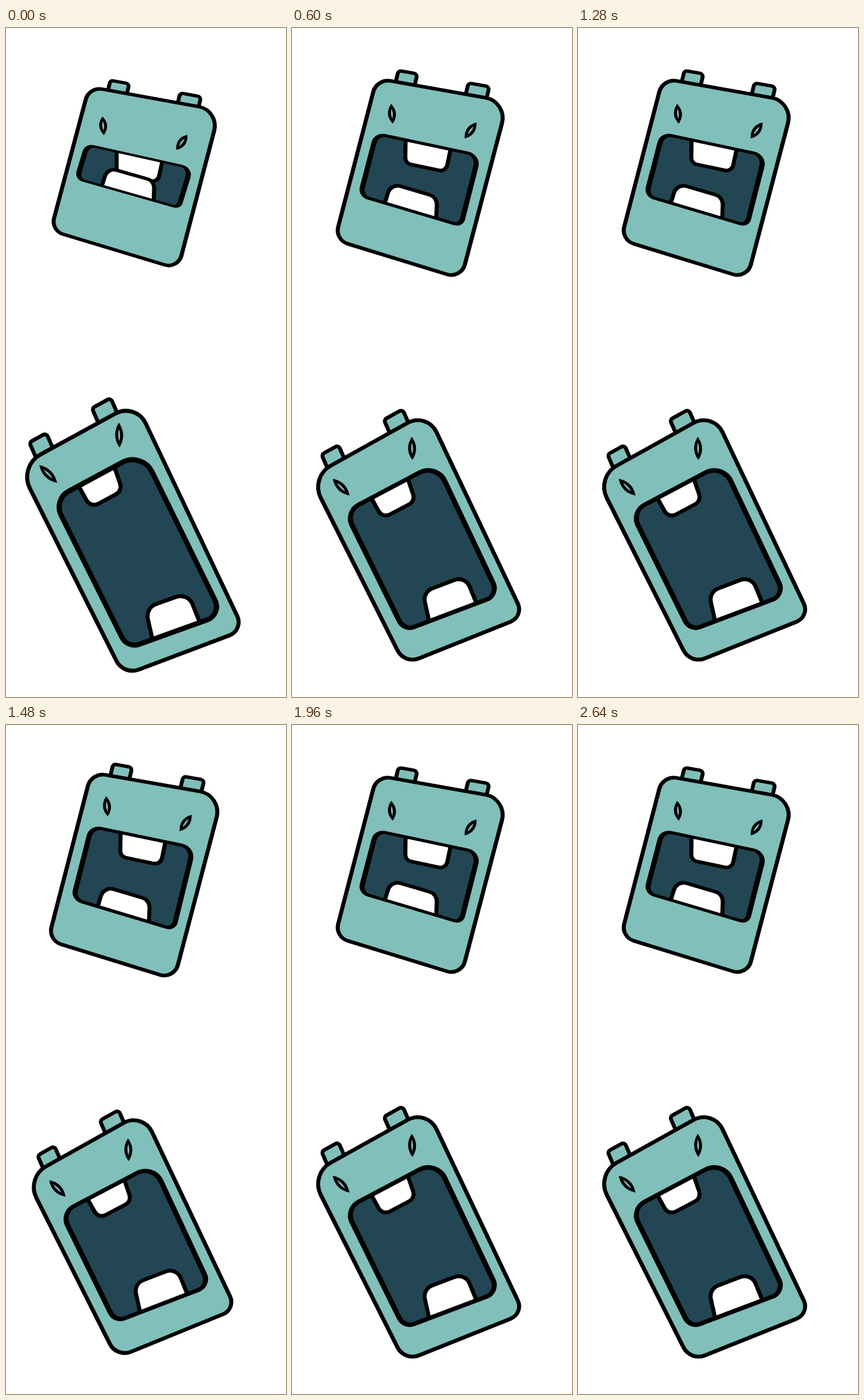
An HTML page with a canvas that plays this animation: 438x1047 px, repeating every 2680 ms.

```html
<!DOCTYPE html>
<html lang="en">
<head>
<meta charset="utf-8">
<title>Chatting monsters</title>
<style>
html, body { margin: 0; width: 100%; height: 100%; overflow: hidden; background: #fff; }
canvas { display: block; width: 438px; height: 1047px; }
</style>
</head>
<body>
<canvas id="stage"></canvas>
<script>
const W = 438, H = 1047, LOOP = 2680, STEP = 40, CYCLE = 17, PEAK = 9;
const SKIN = '#81bfba', DARK = '#224653', INK = '#000', TOOTH = '#fff';

const canvas = document.getElementById('stage');
const ctx = canvas.getContext('2d');
const dpr = window.devicePixelRatio || 1;
canvas.width = W * dpr;
canvas.height = H * dpr;

// Body and mouth: corners clockwise from top left, shut and open.
// Ears and teeth stand on their edges and grow along a vector.
const upper = {
  tilt: 0.25,
  body: {
    shut: [[130, 92], [334, 129], [269, 377], [70, 317]],
    open: [[142, 32], [349, 66], [249, 447], [56, 384]],
    radii: [28, 38, 26, 26]
  },
  mouth: {
    shut: [[127, 183], [289, 219], [270, 281], [111, 236]],
    open: [[150, 102], [303, 128], [243, 411], [91, 358]],
    radii: [26, 30, 18, 24]
  },
  ear: [6, -25],
  eyes: [
    { shut: [152, 153], open: [172, 67], axis: [3, 38] },
    { shut: [275, 179], open: [295, 93], axis: [-23, 31] }
  ],
  topTooth: { from: 0.285, to: 0.725, axis: [-5, 46] },
  lowTooth: { from: 0.245, to: 0.755, axis: [7, -41] }
};

const lower = {
  tilt: -0.46,
  body: {
    shut: [[52, 748], [233, 642], [338, 864], [154, 949]],
    open: [[20, 686], [203, 586], [372, 942], [184, 1013]],
    radii: [40, 34, 22, 28]
  },
  mouth: {
    shut: [[109, 808], [261, 732], [284, 805], [136, 869]],
    open: [[74, 738], [213, 663], [338, 918], [190, 971]],
    radii: [28, 34, 22, 22]
  },
  ear: [-10, -23],
  eyes: [
    { shut: [106, 774], open: [66, 698], axis: [28, 28] },
    { shut: [217, 714], open: [177, 637], axis: [1, 39] }
  ],
  topTooth: { from: 0.285, to: 0.685, axis: [16, 36] },
  lowTooth: { from: 0.265, to: 0.765, axis: [-15, -48] }
};

const lerp = (a, b, t) => a + (b - a) * t;
const mix = (p, q, t) => [lerp(p[0], q[0], t), lerp(p[1], q[1], t)];
const shift = (p, v, k) => [p[0] + v[0] * k, p[1] + v[1] * k];
const pose = (part, w) => part.shut.map((p, i) => mix(p, part.open[i], w));

function roundQuad(pts, radii, scale) {
  const path = new Path2D();
  path.moveTo(...mix(pts[3], pts[0], 0.5));
  pts.forEach((p, i) => path.arcTo(...p, ...pts[(i + 1) % 4], radii[i] * scale));
  path.closePath();
  return path;
}

// Rounded bump standing on the edge a-b, slightly narrower at its end
function bump(a, b, from, to, axis, k, inset, radius) {
  const narrow = (to - from) * inset;
  const left = shift(mix(a, b, from + narrow), axis, k);
  const right = shift(mix(a, b, to - narrow), axis, k);
  const end = mix(a, b, to);
  const path = new Path2D();
  path.moveTo(...mix(a, b, from));
  path.arcTo(...left, ...right, radius);
  path.arcTo(...right, ...end, radius);
  path.lineTo(...end);
  return path;
}

function fill(path, color) {
  ctx.fillStyle = color;
  ctx.fill(path);
}

// Ink line with a pen flattened by k along the tilted body axis
function ink(path, width, tilt, k) {
  const pen = new DOMMatrix().rotate(tilt * 180 / Math.PI).scale(1, k);
  const local = new Path2D();
  local.addPath(path, pen.inverse());
  ctx.save();
  ctx.transform(pen.a, pen.b, pen.c, pen.d, 0, 0);
  ctx.lineWidth = width;
  ctx.stroke(local);
  ctx.restore();
}

function lens(center, axis, k, bulge, color) {
  const len = Math.hypot(...axis);
  const side = [-axis[1] / len, axis[0] / len];
  const p = shift(center, axis, -k / 2), q = shift(center, axis, k / 2);
  const path = new Path2D();
  path.moveTo(...p);
  path.quadraticCurveTo(...shift(center, side, bulge), ...q);
  path.quadraticCurveTo(...shift(center, side, -bulge), ...p);
  fill(path, color);
}

function drawMonster(m, openness) {
  const w = Math.pow(openness, 1.1);
  const pen = lerp(0.85, 1, w);
  const body = pose(m.body, w), mouth = pose(m.mouth, w);

  for (const [from, to] of [[0.145, 0.29], [0.68, 0.84]]) {
    const path = bump(body[0], body[1], from, to, m.ear, lerp(0.62, 1, w), 0, 5);
    fill(path, SKIN);
    ink(path, 6, m.tilt, pen);
  }

  const skin = roundQuad(body, m.body.radii, lerp(0.8, 1, w));
  fill(skin, SKIN);
  ink(skin, 6.3, m.tilt, pen);

  for (const eye of m.eyes) {
    const center = mix(eye.shut, eye.open, w), k = lerp(0.76, 1, w);
    lens(center, eye.axis, k, 12.5, INK);
    lens(center, eye.axis, k * 0.5, 3, SKIN);
  }

  const hole = roundQuad(mouth, m.mouth.radii, lerp(0.45, 1, w));
  fill(hole, DARK);
  ctx.save();
  ctx.clip(hole);
  const [tl, tr, br, bl] = mouth;
  for (const [a, b, tooth, radius] of [[tl, tr, m.topTooth, 14], [bl, br, m.lowTooth, 20]]) {
    const k = lerp(0.72, 1, w);
    const path = bump(a, b, tooth.from, tooth.to, tooth.axis, k, 0.05, radius * k);
    fill(path, TOOTH);
    ink(path, 6.3, m.tilt, pen);
  }
  ctx.restore();
  ink(hole, 8, m.tilt, lerp(0.48, 1, w));
}

function draw(now) {
  const phase = Math.floor((now % LOOP) / STEP) % CYCLE;
  const open = phase < PEAK ? phase / PEAK : (CYCLE - phase) / (CYCLE - PEAK);
  ctx.setTransform(dpr, 0, 0, dpr, 0, 0);
  ctx.fillStyle = '#fff';
  ctx.fillRect(0, 0, W, H);
  ctx.lineJoin = ctx.lineCap = 'round';
  drawMonster(upper, open);
  drawMonster(lower, 1 - open);
}

let start;
function tick(now) {
  if (start === undefined) start = now;
  draw(now - start);
  requestAnimationFrame(tick);
}
draw(0);
requestAnimationFrame(tick);
</script>
</body>
</html>
```
